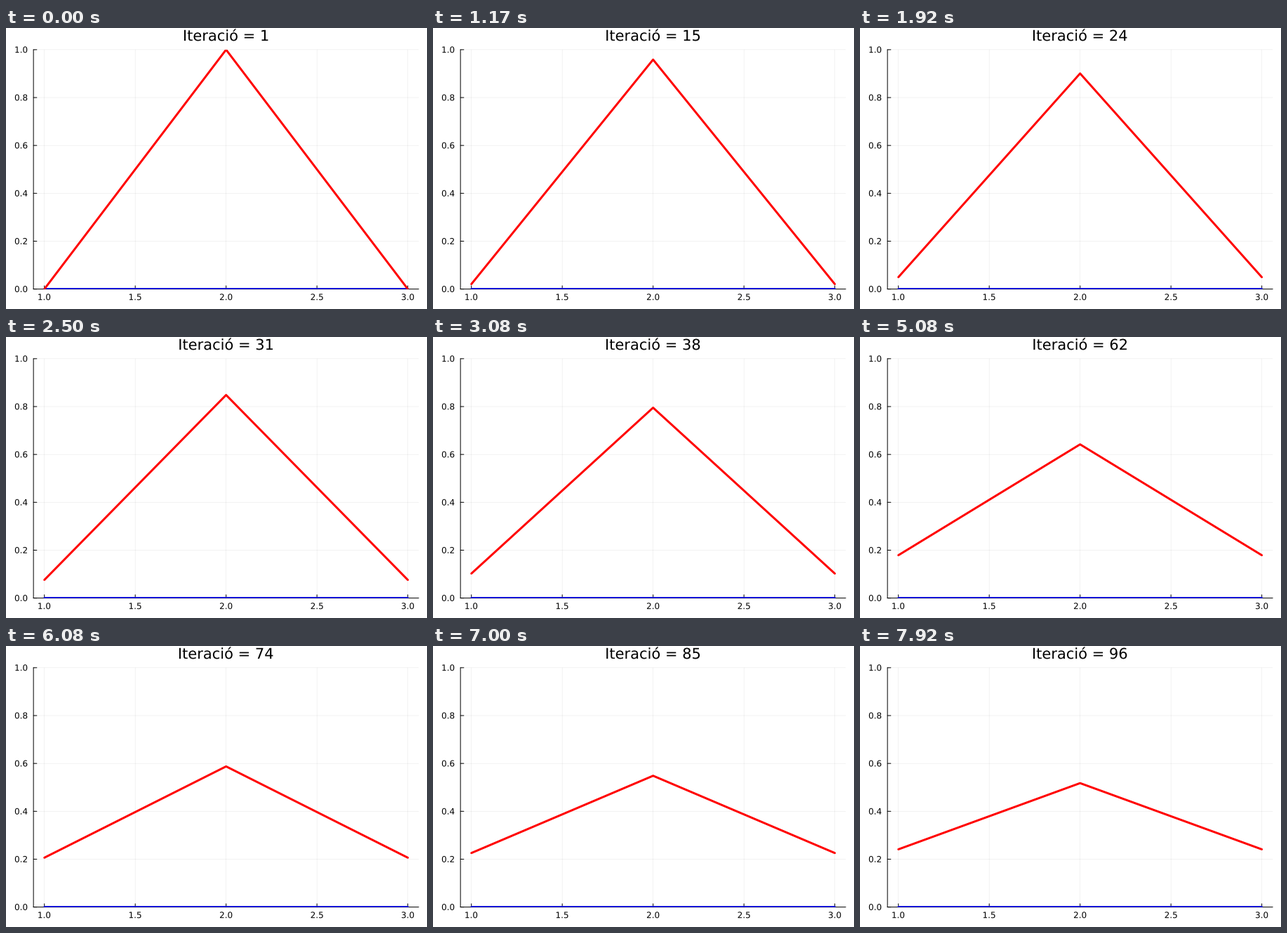
Animation of 600 by 400 pixels, one loop 8 s. Source, as a matplotlib script:

```python
import matplotlib.pyplot as plt
from matplotlib.animation import FuncAnimation
from matplotlib.patches import PathPatch, Rectangle
from matplotlib.textpath import TextPath
from matplotlib.transforms import Affine2D

W, H, DPI = 600, 400, 100
LOOP, STEP, ITERATIONS = 8000, 20, 96
PT = 72 / DPI  # points per pixel

# plot area in pixels, y pointing down
LEFT, RIGHT, TOP, BASE = 39.15, 588.19, 30.87, 371.61
TICK = 4.72
MID = (LEFT + RIGHT) / 2
UNIT = (RIGHT - LEFT) / 2.12

fig = plt.figure(figsize=(W / DPI, H / DPI), dpi=DPI, facecolor="white")
ax = fig.add_axes([0, 0, 1, 1])
ax.set_xlim(0, W)
ax.set_ylim(H, 0)
ax.axis("off")


def px(x):
    return MID + UNIT * (x - 2)


def py(y):
    return BASE - (BASE - TOP) * y


def line(xs, ys, color="black", width=1, **kw):
    return ax.plot(xs, ys, color=color, lw=width * PT, snap=False,
                   solid_capstyle="round", solid_joinstyle="round", **kw)[0]


def text_path(x, y, text, size, centered=True):
    """Glyph outlines with the baseline at y, centred on x or starting there."""
    path = TextPath((0, 0), text, size=size, prop="DejaVu Sans")
    if centered:
        box = path.get_extents()
        x -= (box.x0 + box.x1) / 2
    return path.transformed(Affine2D().scale(1, -1).translate(x, y))


def draw_text(*args, **kw):
    patch = PathPatch(text_path(*args, **kw), fc="black", lw=0, snap=False)
    return ax.add_patch(patch)


def side_height(n):
    """Height of both outer points at iteration n."""
    if n == 1:
        return 0.0
    t2 = (n - 0.7) ** 2
    return t2 / (9234 + 3.13 * t2)


def title_path(n):
    return text_path(MID, 18.14, f"Iteració = {n}", 21)


# grid, ticks and tick labels
for i in range(5):
    x = px(1 + i / 2)
    line([x, x], [TOP, BASE], width=0.5, alpha=0.1)
    line([x, x], [BASE, BASE - TICK])
    draw_text(x, 387.21, f"{1 + i / 2:.1f}", 12)
for i in range(6):
    y = py(i / 5)
    line([LEFT, RIGHT], [y, y], width=0.5, alpha=0.1)
    line([LEFT, LEFT + TICK], [y, y])
    draw_text(12, y + 4.32, f"{i / 5:.1f}", 12, centered=False)

line([LEFT, LEFT], [TOP, BASE])
line([LEFT, RIGHT], [BASE, BASE])

# curves, cut off at the edge of the plot area
area = Rectangle((LEFT, TOP), RIGHT - LEFT, BASE - TOP,
                 transform=ax.transData)
xs = [px(1), px(2), px(3)]
blue = line(xs, [BASE] * 3, "blue", 3)
red = line(xs, [BASE] * 3, "red", 3)
for curve in (blue, red):
    curve.set_clip_path(area.get_path(), area.get_transform())

title = ax.add_patch(PathPatch(title_path(1), fc="black", lw=0, snap=False))


def update(k):
    # the middle of each short step decides which iteration is showing
    t = (k + 0.5) * STEP + 5
    n = min(ITERATIONS, int(t * ITERATIONS / LOOP) + 1)
    side = side_height(n)
    red.set_ydata([py(side), py(1 - 2 * side), py(side)])
    title.set_path(title_path(n))
    return red, title


anim = FuncAnimation(fig, update, frames=LOOP // STEP, interval=STEP,
                     repeat=True, repeat_delay=0, blit=False)
plt.show()
```
